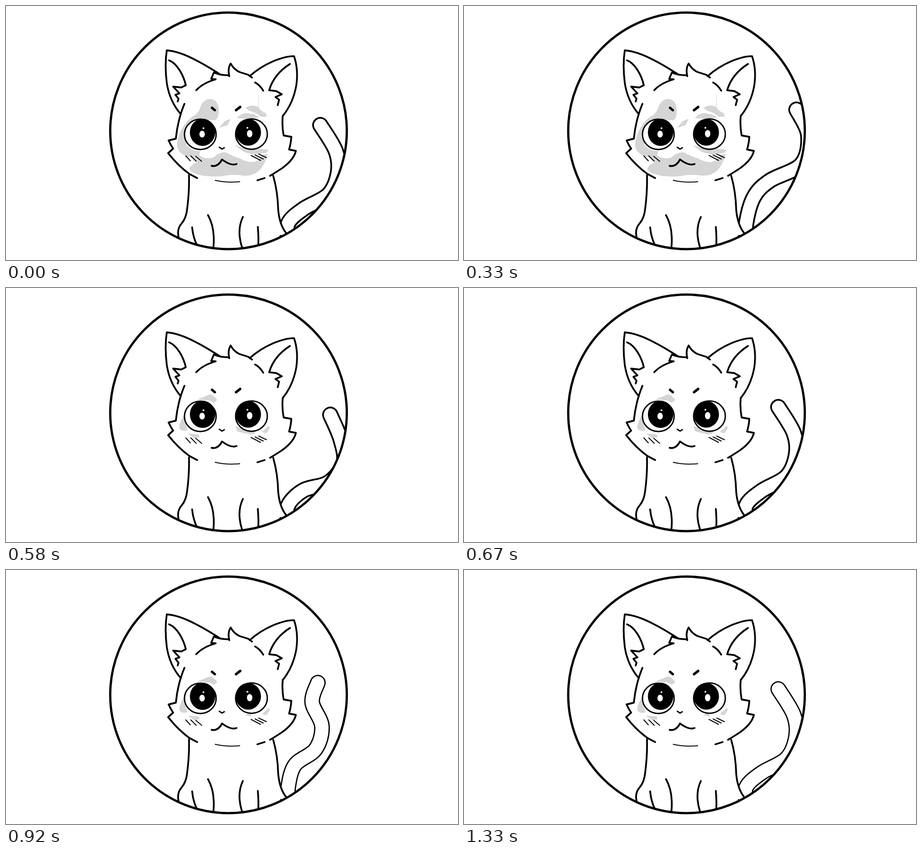
Write an HTML page that moves like this. It is 998 px wide and 561 px high and loops after 1.37 s.

```html
<!DOCTYPE html>
<html lang="en">
<head>
<meta charset="utf-8">
<title>Cat wagging its tail</title>
<style>
  html, body { margin: 0; width: 100%; height: 100%; overflow: hidden; background: #fff; }
  svg { display: block; width: 100vw; height: 100vh; }
  .ink { fill: none; stroke: #000; stroke-width: 3.9; stroke-linecap: round; stroke-linejoin: round; }
  .thin { stroke-width: 2; }
  .bold { stroke-width: 5.5; }
  .shade { fill: #d5d5d5; stroke: #c8c8c8; stroke-width: .8; }
  .white { fill: #fff; }
  #tail path { fill: none; stroke-linecap: round; stroke-linejoin: round; }
</style>
</head>
<body>
<svg viewBox="0 0 998 561">
  <clipPath id="disc"><circle cx="491.3" cy="275.8" r="261.2"/></clipPath>

  <g id="fullShade" class="shade">
    <path d="M378 308C380 283 392 260 410 246Q426 239 430 222Q437 206 451 206Q468 207 469 228Q470 247 462 252L424 249L395 282L398 308Q412 322 428 321L426 330Q440 341 458 335Q472 322 486 324Q503 334 516 337Q532 347 548 345Q562 340 566 330L577 327Q571 350 560 362Q545 376 524 374Q505 371 490 373Q470 378 440 375Q412 371 405 360Q408 350 424 345Q420 336 398 331Q380 324 378 308Z"/>
    <path d="M472 268L483 255L495 250L489 263Z"/>
    <path d="M530 225Q542 217 556 223Q562 233 573 237L575 244L562 244Q552 234 537 231Z"/>
    <path d="M511 247Q518 238 530 237L548 240L558 246L535 249Z"/>
    <path d="M507 308Q530 319 557 316L579 318L574 324L548 327Q526 324 520 318Z"/>
    <path d="M558 196V228"/>
  </g>
  <g id="lightShade" class="shade">
    <path d="M424 246L440 240Q449 234 456 237L466 247L459 253L450 248Z"/>
    <path d="M395 279Q383 296 383 309Q387 317 400 314L396 300Z"/>
    <path d="M403 322L425 324L427 329L416 331Z"/>
    <path d="M566 318L580 305L582 309L575 320Z"/>
    <path d="M529 320L538 316L542 323Z"/>
    <path d="M577 252L580 256"/>
  </g>
  <path id="underEye" class="shade" d="M507 305Q530 318 551 315L547 322Q525 321 511 316Z"/>

  <!-- a black stroke with a narrower white one on top -->
  <g id="tail" clip-path="url(#disc)">
    <path stroke="#000"/>
    <path stroke="#fff"/>
  </g>
  <path class="white" d="M590 375Q600 410 601 450Q604 484 619 502L560 520V375Z"/>

  <g class="ink">
    <circle cx="491.3" cy="275.8" r="261.2" stroke-width="5" style="stroke-width:5"/>
    <!-- ears and hair -->
    <path d="M471 150Q440 130 418 119Q382 100 355 98Q350 130 355 170Q361 210 386 239"/>
    <path d="M360 120C378 127 392 153 397 175L387 180L369 178L383 193L374 196L381 205L379 211"/>
    <path d="M420 186Q435 170 463 162L453 161L459 147Q472 153 492 153"/>
    <path d="M493 155Q489 138 496 127Q503 140 516 146L535 152L543 158"/>
    <path d="M538 155Q560 135 590 122Q620 110 636 111Q646 140 641 175Q634 215 611 243"/>
    <path d="M627 128Q592 150 581 186L597 188L609 195L595 201L603 207L600 219"/>
    <path d="M550 169Q560 174 568 187"/>
    <!-- face -->
    <path d="M394 216Q379 252 375 293L359 297Q363 306 369 315L358 325Q380 353 405 371L422 380"/>
    <path d="M611 243Q609 265 613 286L630 289Q629 304 625 317L640 320Q636 339 610 358Q595 368 583 375"/>
    <path d="M555 385L571 380"/>
    <path class="thin" d="M462 385Q488 391 516 388"/>
    <path class="bold" d="M455 225L461 230M508 230L517 223"/>
    <path d="M471 312L477 316L482 313" stroke-width="3"/>
    <path d="M454 353Q468 356 477 339Q497 354 509 349"/>
    <path class="thin" d="M397 331L407 342M408 331L420 343M419 332L432 343M541 330L562 341M550 329L568 338M558 327L575 335"/>
    <!-- body -->
    <path d="M404 374Q405 410 400 448Q398 468 388 480Q377 492 381 510"/>
    <path d="M590 375Q600 410 601 450Q604 484 619 502"/>
    <path d="M446 462Q462 490 458 533M411 489Q413 510 421 527M523 466Q509 495 521 533M556 488Q558 510 557 528"/>
  </g>

  <!-- eyes -->
  <g class="ink" style="stroke-width:3">
    <ellipse class="white" cx="429" cy="283.5" rx="35" ry="33.5"/>
    <ellipse class="white" cx="542" cy="283" rx="35" ry="33.5"/>
  </g>
  <ellipse cx="434" cy="279" rx="28" ry="30"/>
  <ellipse cx="535" cy="279" rx="28" ry="29.5"/>
  <g class="white">
    <ellipse cx="433" cy="283" rx="6" ry="7.5"/>
    <ellipse cx="538" cy="282" rx="6" ry="8"/>
    <circle cx="436" cy="270" r="2"/>
    <circle cx="533" cy="269" r="2"/>
  </g>
</svg>
<script>
const LOOP = 1370, FPS = 12, TAIL_WIDTH = 32;
const ROOT = [624, 520];
const $ = id => document.getElementById(id);

// Middle line of the tail from root to tip.
const rest = [[623, 480], [657, 448], [712, 416], [733, 368], [728, 320], [694, 263]];
const rightUp = [[623, 480], [640, 422], [675, 386], [745, 349], [760, 285], [734, 229]];
const rightDown = [[622, 482], [656, 446], [712, 443], [758, 405], [750, 350], [738, 297]];
const leftLow = [[622, 480], [638, 434], [684, 401], [696, 348], [670, 294], [701, 253]];
const leftUp = [[626, 480], [638, 420], [682, 380], [702, 335], [694, 286], [651, 237]];

// Each swing starts on a step of the 12-per-second clock.
const SWINGS = [[0, rest], [4, rightUp], [6, rightDown], [8, rest], [10, leftLow], [13, leftUp], [16, rest]];

const mix = (a, b, k) => a + (b - a) * k;
const ease = k => (1 - Math.cos(Math.PI * k)) / 2;

// Smooth curve through all points.
function spline(p) {
  let d = `M${p[0]}`;
  for (let i = 0; i < p.length - 1; i++) {
    const a = p[i], b = p[i + 1];
    const before = p[i - 1] || a, after = p[i + 2] || b;
    const c1 = a.map((v, n) => v + (b[n] - before[n]) / 6);
    const c2 = b.map((v, n) => v - (after[n] - a[n]) / 6);
    d += `C${c1} ${c2} ${b}`;
  }
  return d;
}

function tailAt(step) {
  const i = SWINGS.findLastIndex(([start]) => start <= step);
  const [start, from] = SWINGS[i];
  const [end, to] = SWINGS[i + 1] || [start + 1, from];
  const k = ease((step - start) / (end - start));
  return from.map((p, n) => p.map((v, axis) => mix(v, to[n][axis], k)));
}

function draw(step) {
  const line = step < 9 ? 3.8 : 2.8;
  const d = spline([ROOT, ...tailAt(step)]);
  const [outer, inner] = $('tail').children;
  for (const path of [outer, inner]) path.setAttribute('d', d);
  outer.style.strokeWidth = TAIL_WIDTH + line;
  inner.style.strokeWidth = TAIL_WIDTH - line;

  const show = (id, on) => { $(id).style.display = on ? '' : 'none'; };
  show('fullShade', step < 7);
  show('lightShade', step >= 7);
  show('underEye', step >= 7 && step < 9);
}

let shown = -1;
function tick() {
  const now = performance.now() % LOOP;
  let step = Math.floor((now + 3.5) * FPS / 1000);
  if (step === 2) step = 1; // the second pose is held twice as long
  if (step !== shown) draw(shown = step);
  requestAnimationFrame(tick);
}
tick();
</script>
</body>
</html>
```
